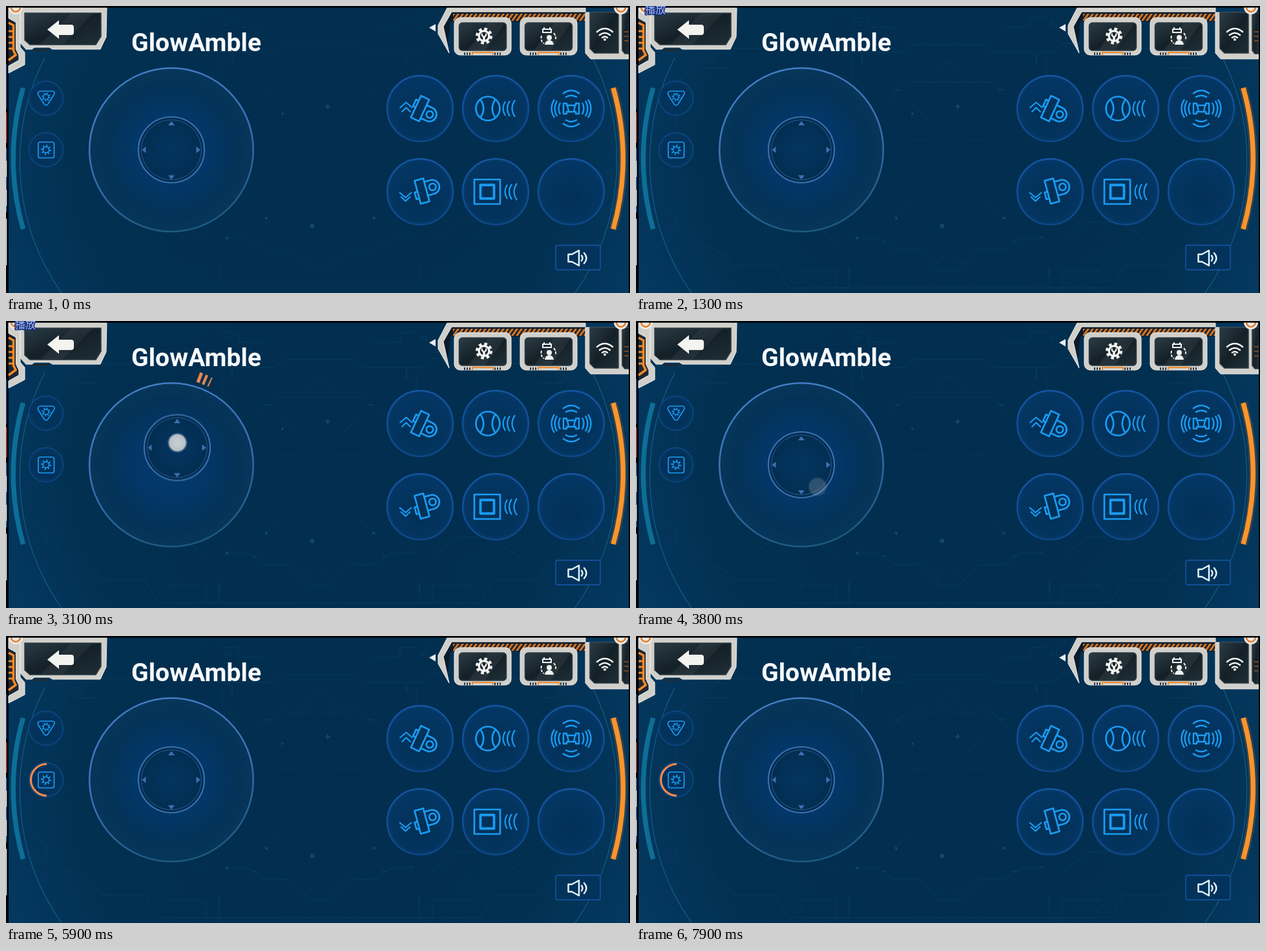
Recreate the animation shown at these times as an HTML page. Size 966 px wide and 445 px high, loop 8 s.

```html
<!DOCTYPE html>
<html lang="en">
<head>
<meta charset="utf-8">
<title>Rover remote</title>
<style>
html, body { margin: 0; width: 100%; height: 100%; overflow: hidden; background: #000; }
svg { display: block; width: 100%; height: 100%; }
text { font-family: Roboto, "Noto Sans CJK SC", "Noto Sans CJK", sans-serif; }
.line { fill: none; stroke: #1b9bf2; stroke-width: 2.7; stroke-linejoin: round; }
.thin { stroke-width: 1.7; }
.pale { fill: none; stroke: #e2f6f8; stroke-width: 2.1; stroke-linecap: round; stroke-linejoin: round; }
.decor { fill: none; stroke: #15517a; stroke-width: 1; }
.metal { fill: #d0cfca; stroke: #efeeea; stroke-width: 1; }
.dark { fill: url(#glass); stroke: #2c3b43; stroke-width: 1.5; }
.decor, .label, .knob, .marks, .touch, .spot, .menu, .arc { animation: 8s step-end infinite; }

.decor { animation-name: decor; }
@keyframes decor { 0% { opacity: .18 } 10%, 100% { opacity: .35 } }

.label { animation-name: label; }
@keyframes label { 0% { opacity: 0 } 11.25% { opacity: 1 } 40%, 100% { opacity: 0 } }

.menu { animation-name: menu; }
@keyframes menu { 0% { opacity: 0 } 76.25% { opacity: 1 } 92.5%, 100% { opacity: 0 } }

.arc { animation-name: arc; }
@keyframes arc { 0% { opacity: 0 } 68.75%, 100% { opacity: 1 } }

.knob { animation-name: knob; }
@keyframes knob {
  0% { transform: translate(0, 0) }
  30% { transform: translate(-6px, -6px); animation-timing-function: steps(3) }
  33.75% { transform: translate(-26px, -9px); animation-timing-function: steps(3) }
  37.5% { transform: translate(-2px, -34px); animation-timing-function: steps(3) }
  41.25% { transform: translate(31px, -12px); animation-timing-function: steps(3) }
  45% { transform: translate(24px, 30px) }
  46.25%, 100% { transform: translate(0, 0) }
}

.marks { animation-name: marks; transform-origin: 256px 223px; }
@keyframes marks {
  0% { opacity: 0; transform: rotate(0) }
  30% { opacity: 1; transform: rotate(0); animation-timing-function: steps(3) }
  33.75% { opacity: 1; transform: rotate(12deg); animation-timing-function: steps(3) }
  37.5% { opacity: 1; transform: rotate(82deg); animation-timing-function: steps(3) }
  41.25% { opacity: 1; transform: rotate(153deg); animation-timing-function: steps(3) }
  45% { opacity: 1; transform: rotate(226deg) }
  46.25%, 100% { opacity: 0; transform: rotate(226deg) }
}

.touch { animation-name: touch; }
@keyframes touch {
  0% { transform: translate(256px, 222px) }
  30% { transform: translate(256px, 222px); animation-timing-function: steps(3) }
  33.75% { transform: translate(226px, 214px); animation-timing-function: steps(3) }
  37.5% { transform: translate(252px, 180px); animation-timing-function: steps(3) }
  41.25% { transform: translate(292px, 206px); animation-timing-function: steps(3) }
  45% { transform: translate(281px, 257px) }
  67.5% { transform: translate(62px, 224px) }
  75% { transform: translate(885px, 391px) }
  83.75% { transform: translate(786px, 398px) }
  91.25%, 100% { transform: translate(885px, 391px) }
}

.spot { animation-name: spot; }
@keyframes spot {
  0% { opacity: 0 }
  28.75% { opacity: .95 } 46.25% { opacity: .55 } 47.5% { opacity: .22 } 48.75% { opacity: 0 }
  67.5% { opacity: .8 } 70% { opacity: .4 } 71.25% { opacity: 0 }
  75% { opacity: .8 } 77.5% { opacity: .4 } 78.75% { opacity: 0 }
  83.75% { opacity: .75 } 86.25% { opacity: .4 } 87.5% { opacity: 0 }
  91.25% { opacity: .8 } 93.75% { opacity: .4 } 95%, 100% { opacity: 0 }
}
</style>
</head>
<body>
<svg viewBox="0 0 966 445" preserveAspectRatio="none">
  <defs>
    <radialGradient id="sea" gradientUnits="userSpaceOnUse" cx="485" cy="225" r="540">
      <stop offset="0" stop-color="#022d4e"/><stop offset=".7" stop-color="#023051"/><stop offset="1" stop-color="#053a62"/>
    </radialGradient>
    <radialGradient id="pad">
      <stop offset="0" stop-color="#033a70"/><stop offset=".45" stop-color="#033767"/><stop offset=".8" stop-color="#043257"/><stop offset="1" stop-color="#07365a"/>
    </radialGradient>
    <radialGradient id="well">
      <stop offset="0" stop-color="#033561"/><stop offset="1" stop-color="#032d50"/>
    </radialGradient>
    <radialGradient id="disc" cy=".6">
      <stop offset="0" stop-color="#023055"/><stop offset="1" stop-color="#043663"/>
    </radialGradient>
    <linearGradient id="rim" x1=".2" x2=".5" y1="0" y2="1">
      <stop offset="0" stop-color="#447fc6"/><stop offset=".5" stop-color="#3a70b6"/><stop offset="1" stop-color="#1d5a80"/>
    </linearGradient>
    <linearGradient id="ring" x2="0" y2="1">
      <stop offset="0" stop-color="#1454a0"/><stop offset="1" stop-color="#0d4787"/>
    </linearGradient>
    <linearGradient id="glass" x2="1" y2="1">
      <stop offset="0" stop-color="#2b3c46"/><stop offset=".5" stop-color="#142027"/><stop offset="1" stop-color="#1f2f38"/>
    </linearGradient>
    <radialGradient id="dot">
      <stop offset="0" stop-color="#d5d9dc"/><stop offset=".78" stop-color="#c3c9ce"/><stop offset=".86" stop-color="#a3afba" stop-opacity=".5"/><stop offset="1" stop-color="#8d9cab" stop-opacity="0"/>
    </radialGradient>
    <pattern id="hatch" width="7" height="12" patternUnits="userSpaceOnUse" patternTransform="skewX(-35)">
      <rect width="7" height="12" fill="#1c222a"/><rect width="3.500" height="12" fill="#d97a28"/>
    </pattern>

    <g id="round">
      <circle r="50.8" fill="url(#disc)" stroke="url(#ring)" stroke-width="2.8"/>
      <circle r="47.5" fill="none" stroke="#073b6b"/>
    </g>
    <g id="small">
      <circle r="26.500" fill="#03325b" stroke="#0c4780" stroke-width="1.800"/>
      <circle r="23.500" fill="none" stroke="#053a68"/>
    </g>
    <g id="sun" class="line">
      <circle r="4.600" style="stroke-width:1.700"/>
      <circle r="6.600" style="stroke-width:2.600" stroke-dasharray="2 3.180"/>
    </g>
    <g id="claw" class="line">
      <rect x="-7" y="-18.500" width="14" height="37"/>
      <path d="M-7 -10h-4.500v11h4.500M7 -9H17a11 11 0 0 1 0 22H7"/>
      <circle cx="17.500" cy="2" r="5.200"/>
    </g>
    <path id="waves" class="line" style="stroke-width:2.200" d="M4 -11Q-3 0 4 11M11 -12Q3 0 11 12M19 -13Q10 0 19 13"/>
    <g id="bell" class="pale">
      <path d="M-14 11H14Q9 7 9 0V-4A9 9 0 0 0 -9 -4V0Q-9 7 -14 11ZM-3 -13.500V-15.500H3V-13.500M-4 12Q-3 16 0 16T4 12"/>
      <path d="M-17 -6Q-21 0 -17 6M-21 -9Q-27 0 -21 9M17 -6Q21 0 17 6M21 -9Q27 0 21 9" stroke-width="1.700"/>
    </g>
    <g id="tool">
      <rect x="-44" y="-29" width="88" height="58" rx="9" class="metal"/>
      <rect x="-36.500" y="-21" width="73" height="43" rx="5" class="dark"/>
      <path d="M8 -20H34L4 21H-22Z" fill="#fff" opacity=".06"/>
      <path d="M-16 29v-4H16v4" fill="none" stroke="#f08a2c" stroke-width="2"/>
      <path d="M-29 27H-18M18 27H29" stroke="#343a3e" stroke-width="4" stroke-dasharray="2 2"/>
    </g>
    <g id="half">
      <path d="M110 92L133 66H190L203 58H310L325 72H415L430 60H485M60 120L125 70M46 310L62 325V345L140 388L150 402H215L236 437H330V405M170 370L220 335H270L310 365M335 18H360V33H400M335 80V110L352 126V150M390 145L420 118H485M425 150L455 180M425 207H455M400 329L430 300M340 360H375L400 378H440L470 410H485M250 410H310V437H485M465 400L475 390M62 150V200L75 215M105 96H145"/>
      <path d="M238 408h20v20h-20zM238 408l20 20M258 408l-20 20" opacity=".5"/>
      <path d="M330 405v15M350 75v14M400 130h10M380 365h8M340 358h5M400 327l5 5" stroke-width="2"/>
      <path d="M465 108Q485 65 505 108" opacity=".6"/>
    </g>
  </defs>

  <rect width="966" height="445" fill="#010408"/>
  <rect x="4" y="2.500" width="960" height="442.500" fill="url(#sea)"/>
  <g stroke-width="1.500">
    <path d="M.5 90V160" stroke="#164e93"/><path d="M.5 165V212" stroke="#d13c37"/>
    <path d="M.5 220V320" stroke="#2779c6"/><path d="M.5 240V265M.5 285V310M.5 330V402" stroke="#d8e3ea"/>
  </g>

  <g class="decor">
    <use href="#half"/>
    <use href="#half" transform="translate(970) scale(-1 1)"/>
    <text x="337" y="31" font-size="11" fill="#15517a" stroke="none">U1</text>
    <text x="641" y="31" font-size="11" fill="#15517a" stroke="none">S1</text>
  </g>
  <g fill="#22577c" opacity=".6">
    <path d="M498 151l1.500 3.500 3.500 1.500-3.500 1.500-1.500 3.500-1.500-3.500-3.500-1.500 3.500-1.500z"/>
    <circle cx="474" cy="341" r="3.500"/><circle cx="428" cy="167" r="2"/><circle cx="403" cy="329" r="2"/><circle cx="570" cy="329" r="2"/><circle cx="342" cy="360" r="2"/>
  </g>

  <g fill="none">
    <path d="M60 80A355 355 0 0 0 86 445M908 80A358 358 0 0 1 881 445" stroke="#14618c" stroke-width="1.100"/>
    <path d="M26.500 127A400 400 0 0 0 26.500 346" stroke="#0d6e96" stroke-width="7.500"/>
    <path d="M940 127A400 400 0 0 1 940 346" stroke="#b5722f" stroke-width="13" opacity=".25"/>
    <path d="M940 127A400 400 0 0 1 940 346" stroke="#fb942c" stroke-width="7.500"/>
  </g>

  <!-- top left -->
  <path class="metal" d="M4 3H22V64L29 72V91L4 104V93L20 84V76L15 68V25L4 19Z"/>
  <path d="M4 20L15 26V67L19 76V83L4 92Z" fill="#20262d"/>
  <path d="M4 26L11.500 30V69L15 76L4 84" fill="none" stroke="#f28a2a" stroke-width="3.500"/>
  <path d="M4 39H11M4 48H11M4 57H11M4 66H11" stroke="#f28a2a" stroke-width="3"/>
  <path class="metal" d="M22 3H156L155 48L146 67H72L67 64H44L40 67H31L22 57Z"/>
  <path class="dark" d="M29 11H147V47L139 60H37L29 53Z"/>
  <path d="M100 12H134L88 59H54Z" fill="#fff" opacity=".05"/>
  <path d="M42 68H66" stroke="#202a30" stroke-width="3"/>
  <path d="M64 36.500L82 22V29H101Q105 29 105 33V41Q105 45 101 45H82V51Z" fill="#f3f3ef"/>
  <circle cx="15" cy="2" r="11" fill="#eceae4"/>
  <circle cx="15" cy="2" r="7" fill="none" stroke="#e67c2b" stroke-width="2.500"/>

  <text x="194" y="70" font-size="39.200" font-weight="700" fill="#f7fafc">GlowAmble</text>

  <!-- top right -->
  <path d="M655 33.500L665 28V39.500Z" fill="#e8eef3"/>
  <path d="M684 6H897V24H688L684 58L674 34Z" fill="#0c1b2b"/>
  <rect x="692" y="12" width="205" height="11" fill="url(#hatch)"/>
  <path class="metal" d="M683 3H897V9H690L677 32L686 73L669 43V30Z"/>
  <use href="#tool" x="738" y="47"/>
  <use href="#tool" x="840" y="47"/>
  <g transform="translate(740 46.500)" fill="none">
    <circle r="9.500" fill="#f3f4f1"/>
    <circle r="10.500" stroke="#f3f4f1" stroke-width="5" stroke-dasharray="4.400 3.847"/>
    <circle r="6.200" fill="#17232a"/>
    <path d="M0 1V8" stroke="#f3f4f1" stroke-width="3.600"/>
    <path d="M-3.200 -4V-1Q0 3.500 3.200 -1V-4" stroke="#f3f4f1" stroke-width="2.200"/>
  </g>
  <g transform="translate(839 46)" fill="none" stroke="#eef2f0" stroke-width="2">
    <path d="M-8 -10H5V-5H-8ZM-6 -13V-10M3 -13V-10"/>
    <path d="M-10 0Q-12 9 -6 12M9 -4Q14 2 11 7" stroke-dasharray="4 2"/>
    <circle cx="2" cy="3" r="4" fill="#eef2f0" stroke="none"/><path d="M-5 14Q-4 7 2 7T9 14Z" fill="#eef2f0" stroke="none"/>
  </g>
  <path class="metal" d="M897 10H964V82H905L897 73Z"/>
  <path class="dark" d="M904 10H948V73H911L904 66Z"/>
  <path class="dark" d="M954 10H964V74H958L954 69Z"/>
  <path d="M957 40H964M957 47H964M957 54H964" stroke="#70472c" stroke-width="2"/>
  <g fill="none" stroke="#f3f5f2" stroke-width="2.600" stroke-linecap="round">
    <path d="M915 40Q927 30 939 40M919 45Q927 38.500 935 45M923 49Q927 46 931 49"/>
    <circle cx="927" cy="52" r=".8"/>
  </g>
  <circle cx="952" cy="2" r="11" fill="#eceae4"/>
  <circle cx="952" cy="2" r="7" fill="none" stroke="#e67c2b" stroke-width="2.500"/>
  <path d="M0 1.200H966" stroke="#010306" stroke-width="2.500"/>
  <path d="M965 0V445" stroke="#010306" stroke-width="2"/>

  <!-- joystick -->
  <circle cx="256" cy="223" r="126.800" fill="url(#pad)" stroke="url(#rim)" stroke-width="2.600"/>
  <g class="knob">
    <circle cx="256" cy="223" r="51" fill="url(#well)" stroke="#3b70ae" stroke-width="2.200"/>
    <circle cx="256" cy="223" r="46.500" fill="none" stroke="#2a5b93"/>
    <path d="M251 185L256 178.500L261 185ZM251 262.500H261L256 269ZM216.500 218V228L210.500 223ZM294.500 218L301 223L294.500 228Z" fill="#3f70b0"/>
  </g>
  <g class="marks" stroke="#ef8a50">
    <path d="M109 199L124 201.500" stroke-width="1.800"/>
    <path d="M107 207.500L123 209.500" stroke-width="4"/>
    <path d="M106 216.500L122 218" stroke-width="5"/>
  </g>

  <!-- light buttons -->
  <use href="#small" x="62" y="143"/>
  <use href="#small" x="62" y="223"/>
  <path class="line thin" d="M53 132H72Q77 133 74 138L65 152Q62 156 59 152L50 138Q48 133 53 132Z"/>
  <use href="#sun" transform="translate(62 141) scale(.85)"/>
  <rect class="line thin" x="50" y="211" width="24.500" height="24.500" rx="3"/>
  <use href="#sun" x="62" y="223"/>
  <path class="arc" d="M63 198.500A24.500 24.500 0 0 0 63 247.500" fill="none" stroke="#f68a4c" stroke-width="3.200"/>

  <!-- action buttons -->
  <use href="#round" x="641" y="159"/><use href="#round" x="758" y="159"/><use href="#round" x="875" y="159"/>
  <use href="#round" x="641" y="288"/><use href="#round" x="758" y="288"/><use href="#round" x="875" y="288"/>
  <use href="#claw" transform="translate(641 159) rotate(25)"/>
  <use href="#claw" transform="translate(644 287) rotate(-15) scale(1 -1)"/>
  <g class="line" style="stroke-width:2.200">
    <path d="M609.500 158L619.500 149.500L629.500 158M612.500 164.500L619.500 157.500L626.500 164.500"/>
    <path d="M609 289L618.500 297L628 289M611 295.500L618.500 302.500L626 295.500"/>
  </g>
  <g class="line">
    <circle cx="746" cy="159" r="18.500"/>
    <path d="M734.500 145Q744 159 734.500 173M757.500 145Q748 159 757.500 173"/>
    <rect x="725" y="269" width="40" height="38"/>
    <rect x="734.500" y="277.500" width="21" height="21" style="stroke-width:3.800"/>
  </g>
  <use href="#waves" x="769" y="159"/>
  <use href="#waves" x="772" y="288"/>
  <g class="line" style="stroke-width:2.400" transform="translate(875 159)">
    <path d="M-12 -8H-7V-5H7V-8H12V8H7V5H-7V8H-12ZM-6 -5L-4 5M6 -5L4 5"/>
    <path d="M-17 -9Q-22 0 -17 9M-22 -12Q-29 0 -22 12M-26 -14Q-35 0 -26 14M17 -9Q22 0 17 9M22 -12Q29 0 22 12M26 -14Q35 0 26 14"/>
    <path d="M-9 -17.500Q0 -23 9 -17.500M-13 -23Q0 -33 13 -23M-9 17.500Q0 23 9 17.500M-13 23Q0 33 13 23"/>
  </g>

  <!-- sounds -->
  <g class="menu">
    <rect x="421" y="364" width="424" height="56" rx="2" fill="#04182d" opacity=".78"/>
    <use href="#bell" x="463" y="392"/><use href="#bell" x="545" y="392"/><use href="#bell" x="628" y="392"/><use href="#bell" x="710" y="392"/><use href="#bell" x="792" y="392"/>
    <g font-size="17" fill="#e6eef2" text-anchor="middle">
      <text x="504" y="399">1</text><text x="586" y="399">2</text><text x="668.500" y="399">3</text><text x="750.500" y="399">4</text><text x="832.500" y="399">5</text>
    </g>
  </g>
  <rect x="851" y="371" width="69" height="38" rx="3" fill="#03325b" stroke="#124f96" stroke-width="1.800"/>
  <path class="pale" style="stroke-width:2.500" d="M870.500 385H876L887 379V402.500L876 396.500H870.500ZM891 387Q894 391 891 395M895 383Q902 391 895 399"/>

  <text class="label" x="14" y="11" font-size="16" font-weight="500" fill="#a9bdf6" stroke="#122a78" stroke-width="3" paint-order="stroke">播放</text>

  <g class="touch"><circle class="spot" r="16" fill="url(#dot)"/></g>
</svg>
</body>
</html>
```
